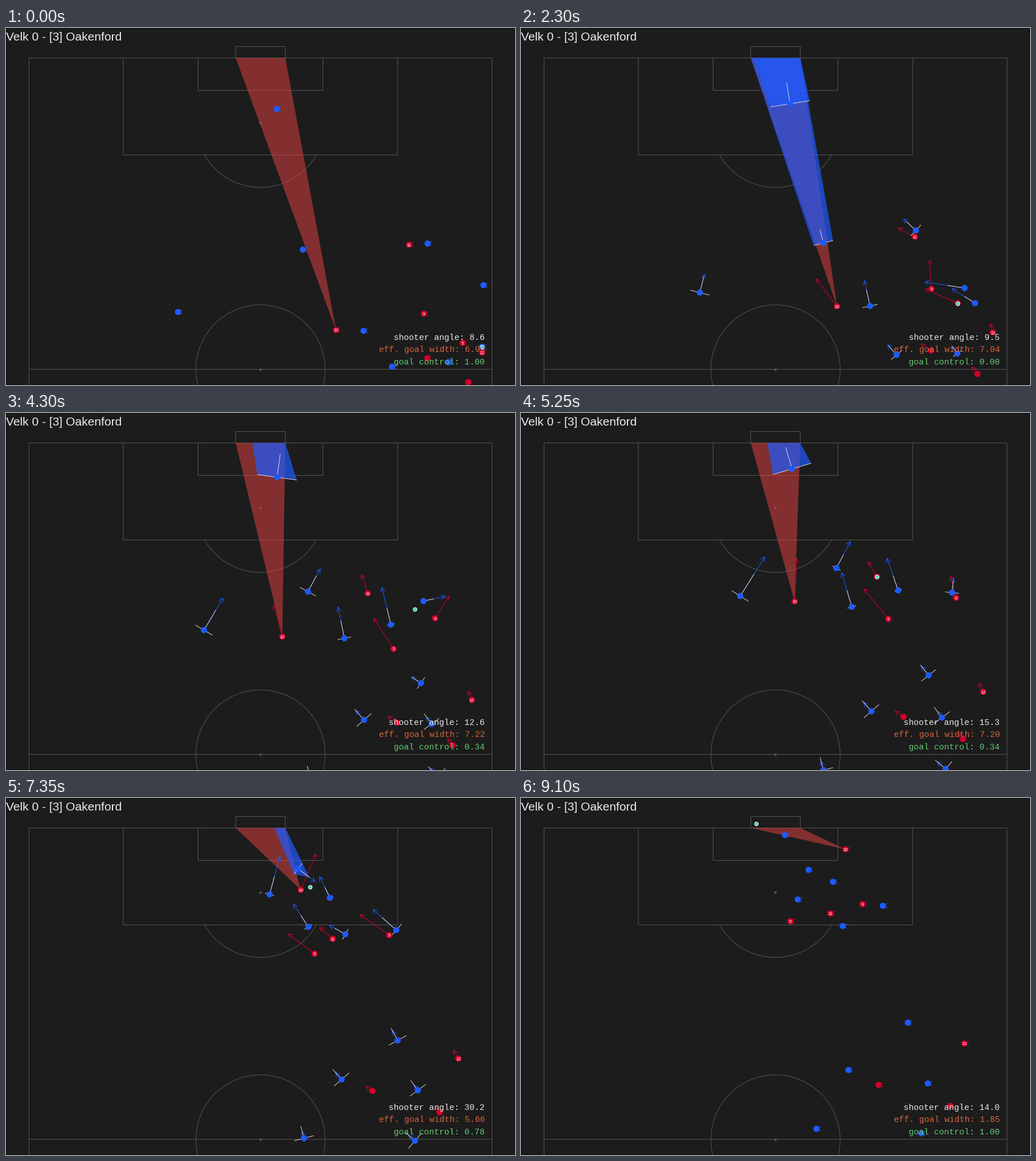
A matplotlib script that plays this animation: 894 px wide and 626 px high, repeating every 9.15 s.

```python
import numpy as np
import matplotlib.pyplot as plt
from matplotlib.animation import FuncAnimation
from matplotlib.collections import LineCollection, PolyCollection
from matplotlib.patches import Arc, Circle, Polygon, Rectangle

W, H, DPI = 894, 626, 100
FRAMES, STEP = 183, 50
PX = 72 / DPI
BG, LINE = "#1c1c1c", "#555555"
BLUE, RED = "#1e5aff", "#d6002a"
MID, GOAL_Y = 447, 52.5
POST_L, POST_R = MID - 43.5, MID + 43.5
SCALE = np.array([11.89, 10.34])     # pixels per metre

TIMES = np.arange(FRAMES) * STEP / 1000
KEYS = (0, 0.95, 2.3, 3.4, 5.25, 7.35, 9.1)


def spline(t, points):
    """Natural cubic spline: positions and velocities for every frame."""
    t, p = np.array(t, float), np.array(points, float)
    h = np.diff(t)
    slope = np.diff(p, axis=0) / h[:, None]
    n = len(t)
    a, rhs = np.zeros((n, n)), np.zeros((n, 2))
    a[0, :2], rhs[0] = (2, 1), 3 * slope[0]
    a[-1, -2:], rhs[-1] = (1, 2), 3 * slope[-1]
    for i in range(1, n - 1):
        g, k = h[i - 1], h[i]
        a[i, i - 1:i + 2] = k, 2 * (g + k), g
        rhs[i] = 3 * (k * slope[i - 1] + g * slope[i])
    m = np.linalg.solve(a, rhs)

    i = np.clip(np.searchsorted(t, TIMES, "right") - 1, 0, n - 2)
    d = h[i][:, None]
    u = (TIMES - t[i])[:, None] / d
    c1, c2 = m[i] * d, (3 * slope[i] - 2 * m[i] - m[i + 1]) * d
    c3 = (m[i] + m[i + 1] - 2 * slope[i]) * d
    return p[i] + c1 * u + c2 * u**2 + c3 * u**3, (c1 + 2 * c2 * u + 3 * c3 * u**2) / d


def stroll(start, end):
    """Set off gently after about a second, then slow down towards the end."""
    s = np.logaddexp(0, (TIMES - 1.2) / 0.25)
    g = 1 - (1 - s / s[-1]) ** 1.3
    pos = np.array(start) + g[:, None] * np.subtract(end, start)
    return pos, np.gradient(pos, STEP / 1000, axis=0)


class Player:
    def __init__(self, color, path, label="", range_=1):
        self.color, self.label, self.range = color, label, range_
        self.pos, self.vel = path
        self.vel[[0, -1]] = 0

    def heading(self, k):
        speed = np.hypot(*self.vel[k])
        return speed, self.vel[k] / speed if speed else np.array([-1.0, 0.0])

    def arrow(self, k):
        _, d = self.heading(k)
        n = np.array([d[1], -d[0]])
        p, tip = self.pos[k], self.pos[k] + self.vel[k]
        return [[p, tip], [tip - 8 * d + 4 * n, tip, tip - 8 * d - 4 * n]]

    def reach(self, k):
        """Forward, left and right ends of the area covered before the ball comes."""
        speed, d = self.heading(k)
        if not speed:
            return None
        p = self.pos[k]
        side = self.range * min(17.5, 3.5 + 0.064 * np.hypot(*(ball_pos[k] - p)))
        n = np.array([d[1], -d[0]]) * side
        return p + d * (side + 0.35 * speed), p + n, p - n


def run(*points, keys=KEYS):
    return spline(keys, points)


defenders = [Player(BLUE, path) for path in (
    run((521.5, 388.5), (522.5, 389.5), (531, 377), (520, 346.5), (554, 272), (569, 175), (505, 126)),
    run((302, 498), (302, 498.5), (314, 464), (324.5, 425), (385, 321), (463, 169), (463.5, 65)),
    run((628, 531), (625, 537), (613, 487.5), (603, 440.5), (581, 340), (531, 226), (486, 178)),
    run((740.5, 378), (739, 378), (693.5, 355), (699.5, 337), (757, 315), (685.5, 231.5), (635.5, 189)),
    run((838.5, 451), (840.5, 453), (779, 456), (703.5, 424), (662.5, 311), (596, 239), (565, 224.5)),
    run((836, 559), (833, 542), (797.5, 482.5), (751, 478.5), (716, 460), (688, 425), (679.5, 394)),
    stroll((678, 594), (575, 477)),
    stroll((777.5, 586), (714.5, 500.5)),
    stroll((550, 698), (519, 580)),
    stroll((812, 680), (703, 588)),
)]
keeper = Player(BLUE, run((475.5, 142), (475, 141), (472.5, 133), (473.5, 126), (476, 98),
                          (476, 95), (513, 124), (548, 147),
                          keys=(*KEYS[:5], 6, *KEYS[5:])), range_=2)
defenders.append(keeper)

five, nine, eleven, shooter = attackers = [Player(RED, path, label) for label, path in (
    ("5", run((802, 552), (825, 524), (767, 482.5), (714, 455), (645, 361), (542, 273), (473, 216))),
    ("9", run((734, 501), (733, 502.5), (721, 457.5), (730.5, 399), (764, 324), (673, 240.5), (599.5, 186))),
    ("11", run((708, 380), (709, 380), (692, 366), (652, 344), (625, 287), (574, 247), (543.5, 202.5))),
    ("10", run((579.5, 529.5), (581, 539), (555, 488), (508.5, 437.5), (480.5, 330.5), (517.5, 161), (570, 90))),
)]
attackers += [
    Player(RED, run((836, 569), (823.5, 517), (778.5, 430.5), keys=(0, 3.4, 9.1)), "12"),
    Player(RED, stroll((740, 579), (628, 503))),
    Player(RED, stroll((812, 621), (753.5, 540))),
]
players = defenders + attackers


def ball_path():
    """Straight passes between spells in which a player carries the ball."""
    spells = ((five, 0.8, 2.4, (0, 0)), (nine, 3.3, 4.0, (16, -5)),
              (eleven, 4.9, 5.6, (0, 0)), (shooter, 7.2, 8.35, (16, -5)))
    known = {0: np.array([836, 559]), FRAMES - 1: np.array([413, 45])}
    for p, start, stop, offset in spells:
        for k in range(round(start * 20), round(stop * 20) + 1):
            known[k] = p.pos[k] + offset
    at = sorted(known)
    xy = np.array([known[k] for k in at])
    return np.column_stack([np.interp(range(FRAMES), at, c) for c in xy.T])


ball_pos = ball_path()

fig = plt.figure(figsize=(W / DPI, H / DPI), dpi=DPI, facecolor=BG)
ax = fig.add_axes([0, 0, 1, 1])
ax.set_xlim(0, W)
ax.set_ylim(H, 0)
ax.axis("off")


def box(half, top, bottom, color=LINE):
    ax.add_patch(Rectangle((MID - half, top), 2 * half, bottom - top, fill=False,
                           ec=color, lw=PX, zorder=1, snap=False))


def text(x, y, s, size, color="white", **kw):
    return ax.text(x, y, s, fontsize=size * PX, color=color, **kw)


# pitch
box(W / 2 - 0.5, 0.5, H - 0.5, "#0c0c0c")
box(406.5, GOAL_Y, 598.5)
box(406.5, 598.5, H + 500)
box(241, GOAL_Y, 222.5)
box(109.5, GOAL_Y, 109.5)
box(43.5, 32.5, GOAL_Y)
ax.add_patch(Circle((MID, 599), 113.5, fill=False, ec=LINE, lw=PX))
ax.add_patch(Arc((MID, 166), 227, 227, theta1=30, theta2=150, ec=LINE, lw=PX))
for y in (166, 599):
    ax.add_patch(Circle((MID, y), 2.2, color=LINE, lw=0))

# moving parts
cone = Polygon([(POST_L, GOAL_Y), (POST_R, GOAL_Y), (MID, 300)], fc="#ea4242", alpha=0.5, lw=0, zorder=2)
ax.add_patch(cone)
shadows = PolyCollection([], facecolors=BLUE, alpha=0.7, linewidths=0, zorder=3)
arrows = LineCollection([], linewidths=PX, zorder=4)
arrows.set_color([p.color for p in players for _ in range(2)])
crosses = LineCollection([], colors="#d8d8d8", linewidths=PX, zorder=5)
for c in (shadows, arrows, crosses):
    ax.add_collection(c, autolim=False)
dots = ax.scatter([0] * len(players), [0] * len(players), s=(10.8 * PX) ** 2,
                  c=[p.color for p in players], linewidths=0, zorder=6)
labels = [(p, text(0, 0, p.label, 8, ha="center", va="center_baseline", zorder=7,
                   family="Liberation Sans", clip_on=True)) for p in players if p.label]
ball = ax.scatter([0], [0], s=(6.8 * PX) ** 2, c="#3fe0a8", edgecolors="white",
                  linewidths=0.9 * PX, zorder=8)

text(0, 21.5, "Velk 0 - [3] Oakenford", 21, "#ececec", family="Liberation Sans", zorder=9)
readout = [text(841, y, "", 14.8, c, ha="right", va="baseline", family="Liberation Mono", zorder=9)
           for y, c in ((547, "#e8e8e8"), (568, "#d9643c"), (590, "#62c973"))]


def shadow(player, k):
    """Shaded quad and the goal-line span that a defender closes off."""
    s, ends = shooter.pos[k], player.reach(k)
    if ends is None or player.pos[k][1] > s[1] - 3:
        return None
    ends = [e for e in ends if e[1] < s[1] - 3]
    if len(ends) < 2:
        return None
    hits = [s[0] + (e[0] - s[0]) * (s[1] - GOAL_Y) / (s[1] - e[1]) for e in ends]
    hits = np.clip(hits, POST_L, POST_R)
    lo, hi = hits.argmin(), hits.argmax()
    if hits[hi] - hits[lo] < 6:
        return None
    quad = [(hits[lo], GOAL_Y), (hits[hi], GOAL_Y), tuple(ends[hi]), tuple(ends[lo])]
    return quad, (hits[lo], hits[hi])


def open_share(spans):
    free, edge = 0, POST_L
    for lo, hi in sorted(spans):
        free += max(0, lo - edge)
        edge = max(edge, hi)
    return (free + POST_R - edge) / (POST_R - POST_L)


def update(k):
    s = shooter.pos[k]
    cone.set_xy([(POST_L, GOAL_Y), (POST_R, GOAL_Y), tuple(s)])

    closed = [c for c in (shadow(p, k) for p in defenders) if c]
    shadows.set_verts([quad for quad, _ in closed])
    arrows.set_segments([seg for p in players for seg in p.arrow(k)])
    bars = []
    for p in defenders:
        ends = p.reach(k)
        if ends:
            bars += [[p.pos[k], ends[0]], [ends[1], ends[2]]]
    crosses.set_segments(bars)

    dots.set_offsets([p.pos[k] for p in players])
    for p, label in labels:
        label.set_position(p.pos[k] + (0, 0.3))
    ball.set_offsets([ball_pos[k]])

    left, right = [(s - (x, GOAL_Y)) / SCALE for x in (POST_L, POST_R)]
    angle = np.arctan2(*left) - np.arctan2(*right)
    width = min(np.hypot(*left), np.hypot(*right)) * angle
    readout[0].set_text(f"shooter angle: {np.degrees(angle):.1f}")
    readout[1].set_text(f"eff. goal width: {width:.2f}")
    readout[2].set_text(f"goal control: {open_share([c for _, c in closed]):.2f}")
    return [cone, shadows, arrows, crosses, dots, ball, *readout]


anim = FuncAnimation(fig, update, frames=FRAMES, interval=STEP, init_func=lambda: update(0),
                     repeat=True, repeat_delay=0, blit=False)
plt.show()
```
